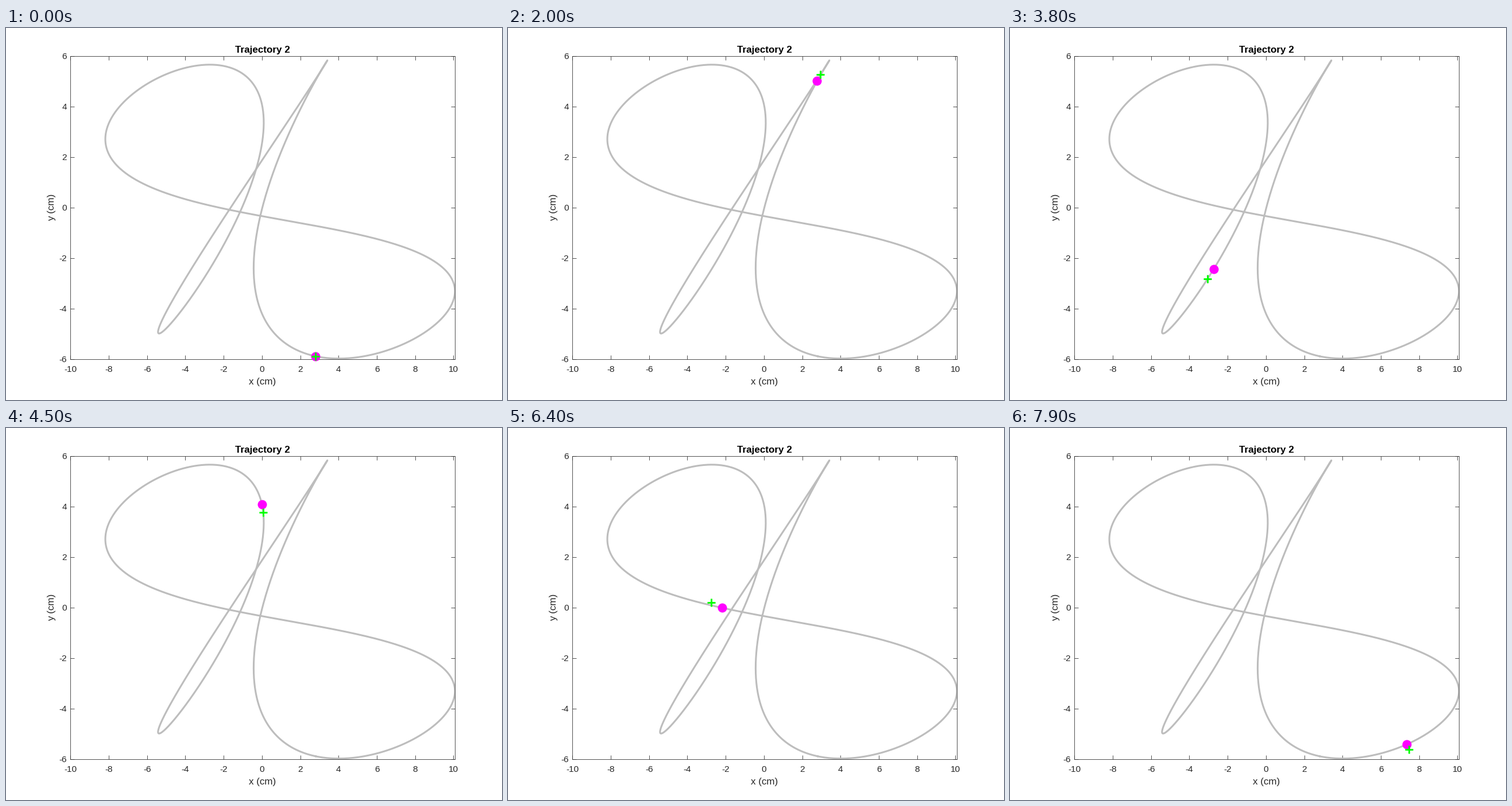
Recreate the animation shown at these times as a matplotlib script. Size 864 px wide and 648 px high, loop 8 s.

```python
import numpy as np
import matplotlib.pyplot as plt
from matplotlib.animation import FuncAnimation

plt.rcParams["font.family"] = "Liberation Sans"
plt.rcParams["axes.unicode_minus"] = False

W, H, FRAMES, STEP = 864, 648, 80, 0.1
INK = "#262626"

# The path sums three harmonics, each swinging along its own direction.
AMPLITUDE = 5
DIRECTIONS = np.radians([-23, -60, 30])
PHASES = np.radians([0, 60, 135])
SPEED = np.radians(43.84)
START = 0.1


def curve(angle):
    """Points of the path as complex numbers x + iy, in cm."""
    swing = np.cos(np.outer(np.atleast_1d(angle), [1, 2, 3]) + PHASES)
    return AMPLITUDE * swing @ np.exp(1j * DIRECTIONS)


def target_at(t):
    return curve(SPEED * max(t - START, 0))


def cursor_at(t):
    """The cursor trails the target, catches up and begins to sway."""
    lag = 0.046 * np.sqrt(1 - (t / 8) ** 4)
    late = max(t - 4.5, 0)
    sway = 0.085 * late * np.sin(np.pi * late / 2.6)
    return target_at(t - lag) + 1j * sway


loop = curve(np.linspace(0, 2 * np.pi, 1200))

fig = plt.figure(figsize=(W / 72, H / 72), dpi=72, facecolor="white")
ax = fig.add_axes([0.13, 0.11, 0.775, 0.815])
ax.set_xlim(-10, loop.real.max())
ax.set_ylim(-6, 6)
ax.set_xticks(range(-10, 11, 2))
ax.set_yticks(range(-6, 7, 2))
ax.tick_params(direction="in", top=True, right=True, length=6.7, width=0.8,
               color=INK, labelcolor=INK, labelsize=15.4)
ax.tick_params(axis="x", pad=11)
ax.tick_params(axis="y", pad=6.5)
for spine in ax.spines.values():
    spine.set(linewidth=0.8, color=INK)


def label(x, y, text, **style):
    fig.text(x / W, 1 - y / H, text, fontsize=17, ha="center", **style)


label(447.1, 42.5, "Trajectory 2", weight="bold", color="black")
label(447.1, 620.5, "x (cm)", color=INK)
label(79.5, 312.6, "y (cm)", color=INK, rotation=90, va="center")

ax.plot(loop.real, loop.imag, color="#bdbdbd", lw=3.1, zorder=3)
target, = ax.plot([], [], "o", ms=16, mew=0, color="#ff00ff",
                  clip_on=False, zorder=4)
cursor, = ax.plot([], [], "+", ms=14, mew=3, color="#00ff00",
                  clip_on=False, zorder=5)


def draw(i):
    t = i * STEP
    for marker, z in ((target, target_at(t)), (cursor, cursor_at(t))):
        marker.set_data(z.real, z.imag)
    return target, cursor


anim = FuncAnimation(fig, draw, frames=FRAMES, interval=1000 * STEP,
                     repeat=True, repeat_delay=0)
plt.show()
```
